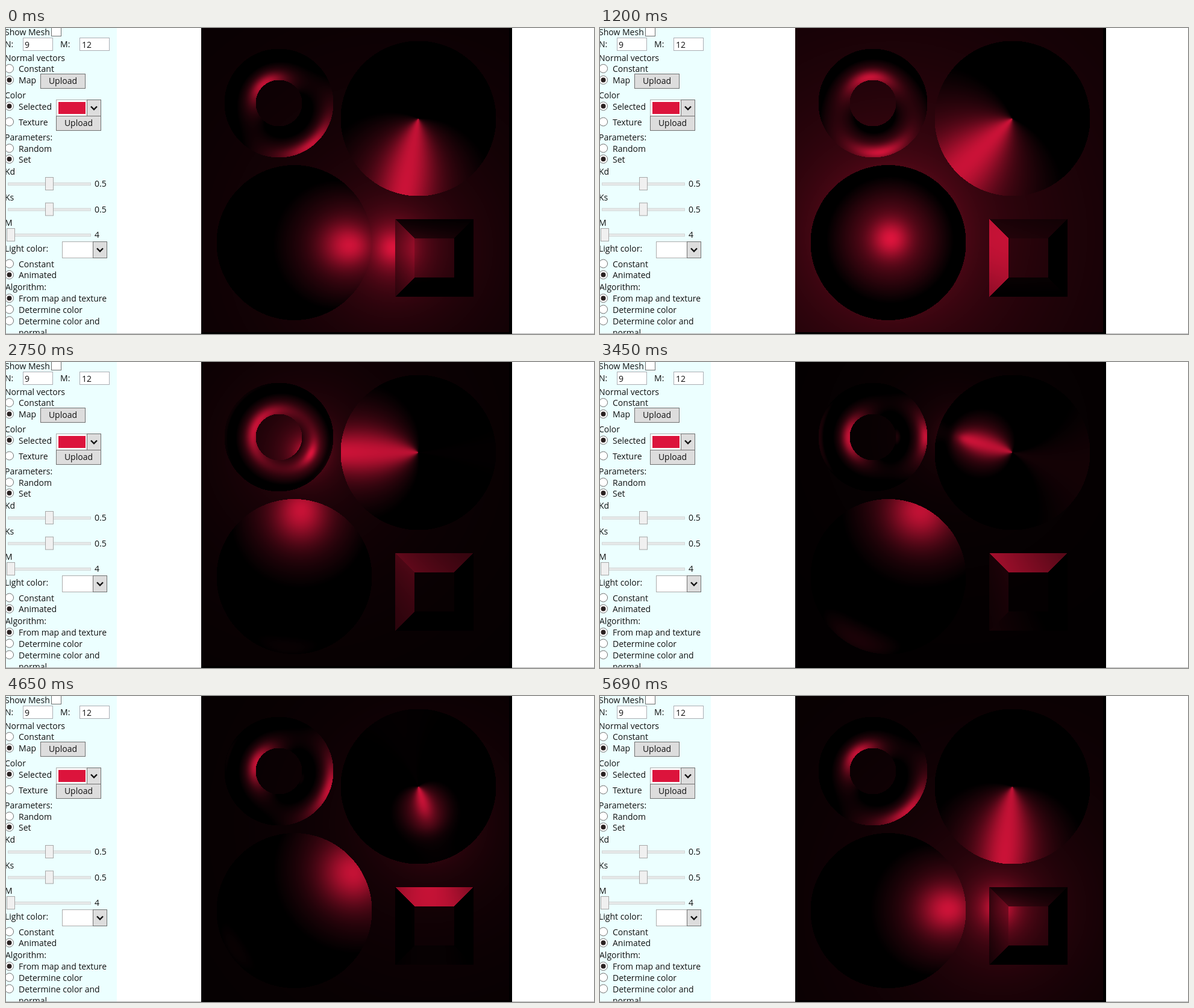
An HTML page with a canvas that plays this animation: 976 by 509 pixels, repeating every 5860 ms.

```html
<!DOCTYPE html>
<html lang="en">
<head>
<meta charset="utf-8">
<title>Normal map lighting</title>
<style>
  html, body { margin: 0; width: 100%; height: 100%; overflow: hidden; background: #fff; }
  svg, canvas { position: absolute; top: 0; display: block; }
  svg { left: 0; }
  canvas { left: 324px; }
  text { font: 14px "Open Sans", "Noto Sans", sans-serif; fill: #111; }
  .mid { text-anchor: middle; }
</style>
</head>
<body>
<svg id="ui" width="976" height="509" viewBox="0 0 976 509">
  <rect width="184" height="509" fill="#ecffff"/>
</svg>
<canvas id="view" width="516" height="509"></canvas>
<script>
// ---------- Side panel ----------
const ui = document.getElementById('ui');

function add(tag, attrs, content) {
  const el = document.createElementNS('http://www.w3.org/2000/svg', tag);
  for (const key in attrs) el.setAttribute(key, attrs[key]);
  if (content) el.textContent = content;
  ui.appendChild(el);
}
const label = (x, y, s, cls = '') => add('text', { x, y: y + 5, class: cls }, s);
const box = (x, y, w, h, fill, stroke) =>
  add('rect', { x: x + .5, y: y + .5, width: w - 1, height: h - 1, fill, stroke });

function radio(y, s, on) {
  add('circle', { cx: 5.5, cy: y, r: 7, fill: '#fff', stroke: '#707070' });
  if (on) add('circle', { cx: 5.5, cy: y, r: 4, fill: '#2a2222' });
  label(21, y + .5, s);
}
function button(x, y, s) {
  box(x, y, 75, 25, '#ddd', '#707070');
  label(x + 37.5, y + 12, s, 'mid');
}
function combo(x, y, color) {
  box(x, y, 75, 28, '#fff', '#acacac');
  add('rect', { x: x + 4, y: y + 4, width: 45, height: 20, fill: color });
  box(x + 51, y, 24, 28, '#ddd', '#707070');
  add('path', { d: `M${x + 58} ${y + 11.5}l5 5 5-5`, fill: 'none', stroke: '#111', 'stroke-width': 2.4 });
}
function slider(y, name, thumb, value) {
  label(-2, y - 20, name);
  box(3, y - 2, 138, 5, '#e7eaea', '#d2d6d6');
  box(thumb, y - 11, 14, 22, '#f0f0f0', '#a6a6a6');
  label(147, y, value);
}

label(-2, 7, 'Show Mesh');
box(75, -2, 17, 16, '#fff', '#707070');
label(-2, 27, 'N:');
box(28, 16, 50, 22, '#fff', '#abadb3');
label(31, 28, '9');
label(90, 27, 'M:');
box(122, 16, 50, 22, '#fff', '#abadb3');
label(126, 28, '12');
label(-2, 50, 'Normal vectors');
radio(67.5, 'Constant');
radio(86.5, 'Map', true);
button(57, 76, 'Upload');
label(-2, 112, 'Color');
radio(130, 'Selected', true);
combo(83, 119, '#dc143c');
radio(156, 'Texture');
button(83, 146, 'Upload');
label(-2, 182, 'Parameters:');
radio(200, 'Random');
radio(218, 'Set', true);
slider(259, 'Kd', 65, '0.5');
slider(301.5, 'Ks', 65, '0.5');
slider(344, 'M', 1, '4');
label(-2, 367, 'Light color:');
combo(93, 355, '#fff');
radio(392, 'Constant');
radio(410.5, 'Animated', true);
label(-1, 431, 'Algorithm:');
radio(449.5, 'From map and texture', true);
radio(468, 'Determine color');
radio(487, 'Determine color and');
label(21, 507, 'normal');
add('rect', { y: 508, width: 976, height: 1, fill: '#b4b4b4' });

// ---------- Normal map ----------
const LEFT = 324, W = 511, H = 506;
const CONE = Math.sin(.65), BEVEL = Math.sin(.69), ROUND = .75;

// Horizontal part of the surface normal at a stage position.
function slope(x, y) {
  let dx = x - 453, dy = y - 125, r = Math.hypot(dx, dy);
  if (r > 38.5 && r < 90.5) {
    const s = ROUND * (r - 64.5) / 26 / r;
    return [dx * s, dy * s];
  }
  dx = x - 684.5; dy = y - 150.5; r = Math.hypot(dx, dy) || 1;
  if (r < 129) return [dx / r * CONE, dy / r * CONE];
  dx = x - 478.5; dy = y - 357; r = Math.hypot(dx, dy);
  if (r < 129) return [dx / 129 * ROUND, dy / 129 * ROUND];
  dx = x - 711; dy = y - 382.5;
  const ax = Math.abs(dx), ay = Math.abs(dy), m = Math.max(ax, ay);
  if (m > 32.5 && m < 65)
    return ax > ay ? [Math.sign(dx) * BEVEL, 0] : [0, Math.sign(dy) * BEVEL];
  return [0, 0];
}

const normals = new Float32Array(W * H * 3);
for (let y = 0, i = 0; y < H; y++) {
  for (let x = 0; x < W; x++, i += 3) {
    const [nx, ny] = slope(x + LEFT + .5, y + .5);
    normals[i] = nx;
    normals[i + 1] = ny;
    normals[i + 2] = Math.sqrt(1 - nx * nx - ny * ny);
  }
}

// ---------- Phong shading ----------
const ctx = document.getElementById('view').getContext('2d');
ctx.fillRect(0, 0, 516, 509);
const image = ctx.createImageData(W, H);
const px = image.data;

function shade([lx, ly, lz]) {
  const back = Math.max(0, Math.min(.95, 1.05 - lz / 80));
  for (let y = 0, i = 0, p = 0; y < H; y++) {
    const dy = ly - y - .5;
    for (let x = 0; x < W; x++, i += 3, p += 4) {
      const dx = lx - LEFT - x - .5;
      const d = Math.sqrt(dx * dx + dy * dy + lz * lz);
      const nz = normals[i + 2];
      const nl = (normals[i] * dx + normals[i + 1] * dy + nz * lz) / d;
      const rz = 2 * nl * nz - lz / d;
      const spec = rz * rz * rz * rz * (rz < 0 ? back : 1);
      const light = Math.max(0, .5 * nl + .5 * spec);
      px[p] = 220 * light;
      px[p + 1] = 20 * light;
      px[p + 2] = 60 * light;
      px[p + 3] = 255;
    }
  }
  ctx.putImageData(image, 0, 0);
}

// ---------- Light path: a circle with changing height ----------
const LOOP = 5860, STEPS = 34, TICK = LOOP / STEPS;
const HELD = [9, 21, 32];
// step, angle in degrees, height
const PATH = [
  [0, 60, 42], [3, 91, 58], [7, 135, 82], [12, 190, 40],
  [20, 276, 11], [27, 342, 25], [33, 410, 37], [34, 420, 42]
];

function lightAt(step) {
  const n = PATH.findIndex(k => k[0] > step);
  const a = PATH[n - 1], b = PATH[n];
  const u = (step - a[0]) / (b[0] - a[0]);
  const angle = (a[1] + (b[1] - a[1]) * u) * Math.PI / 180;
  return [578 + 130 * Math.cos(angle), 253 + 130 * Math.sin(angle), a[2] + (b[2] - a[2]) * u];
}

let shown = -1;
const start = performance.now();
function frame() {
  const t = Math.max(0, performance.now() - start) % LOOP;
  let step = Math.min(STEPS - 1, Math.floor((t + 14) / TICK));
  if (HELD.includes(step)) step--;
  if (step !== shown) {
    shown = step;
    shade(lightAt(step));
  }
  requestAnimationFrame(frame);
}
frame();
</script>
</body>
</html>
```
